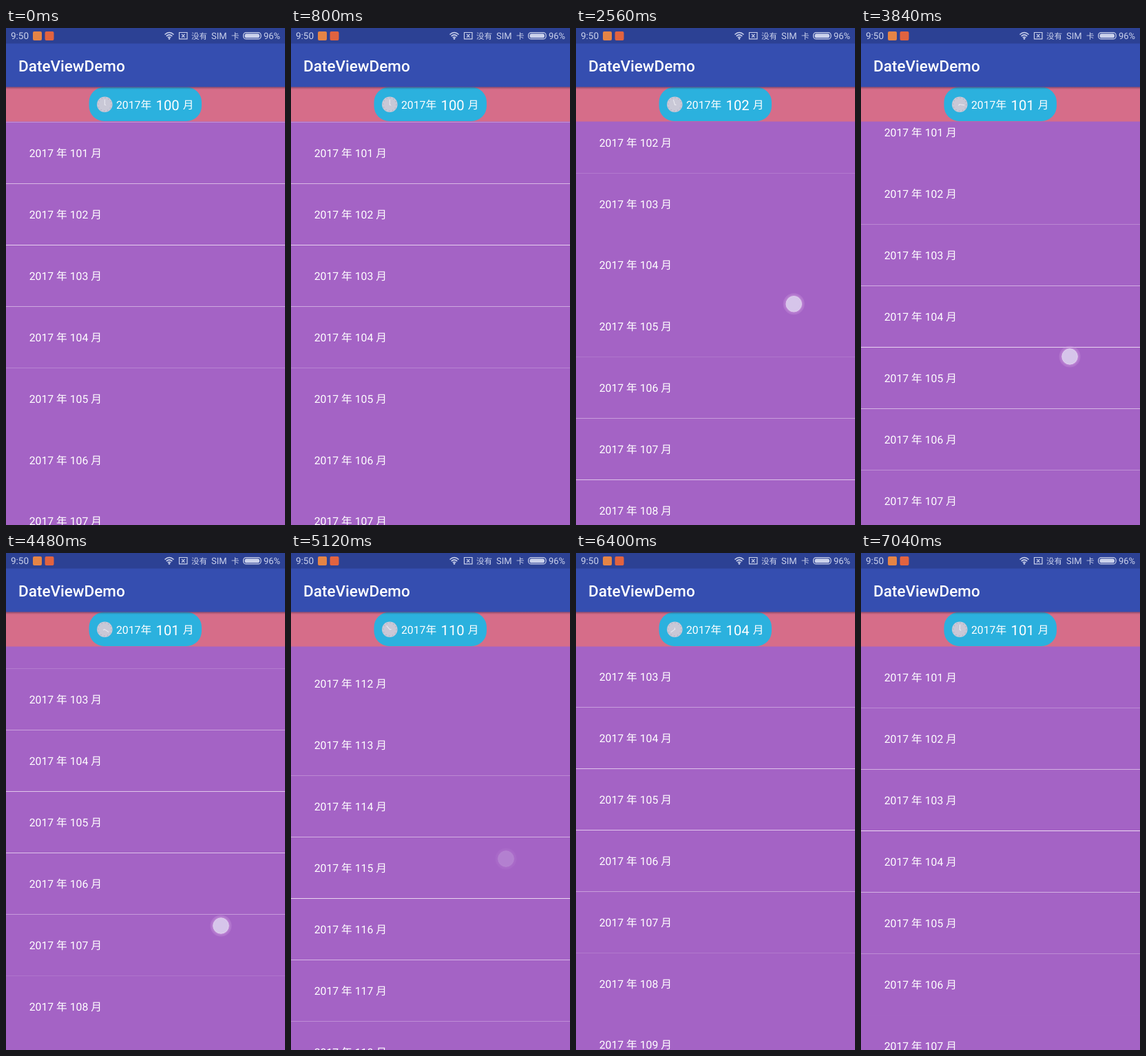
Animation, 405 px wide and 720 px high, one loop 7.2 s. Source, as an HTML page:

```html
<!DOCTYPE html>
<html lang="zh-CN">
<head>
<meta charset="utf-8">
<title>DateViewDemo</title>
<style>
  html, body { margin: 0; width: 100%; height: 100%; overflow: hidden; background: #a463c5; }
  svg { display: block; width: 405px; height: 720px; }
  text {
    font: 15.75px Roboto, "Noto Sans CJK SC", "Noto Sans CJK", sans-serif;
    fill: #fff; white-space: pre; text-rendering: geometricPrecision;
  }
  .status text { font-size: 13px; fill: #cbd2ec; }
  .status .cjk { font-size: 11.6px; }
  .status .line { fill: none; stroke: #cbd2ec; stroke-width: 1.2; }
</style>
</head>
<body>
<svg viewBox="0 0 405 720">
  <defs>
    <linearGradient id="shade" x2="0" y2="1">
      <stop stop-color="#402040" stop-opacity=".5"/>
      <stop offset="1" stop-color="#402040" stop-opacity="0"/>
    </linearGradient>
    <clipPath id="view"><rect y="135" width="405" height="585"/></clipPath>
  </defs>

  <rect width="405" height="720" fill="#a463c5"/>
  <g id="list" clip-path="url(#view)"></g>
  <circle id="glow" cx="202.5" r="1706" fill="#354eb0"/>

  <rect y="85" width="405" height="50.5" fill="#d66d89"/>
  <rect x="120.5" y="85.5" width="163.5" height="49.5" rx="22" fill="#2bb1de"/>
  <rect y="85" width="405" height="4" fill="url(#shade)"/>
  <g transform="translate(143.3 110.7)">
    <circle r="11.3" fill="#c9c8d6"/>
    <circle r="9.6" fill="none" stroke="#aaa7bc" stroke-width="1.5" stroke-dasharray="1 4.027"/>
    <path id="hand" d="M0 1V-7M0 0L2 1.5" fill="none" stroke="#ececf3" stroke-width="1"/>
  </g>
  <text x="160" y="117">2017年</text>
  <text id="month" x="217.5" y="118.5" style="font-size:20.25px"></text>
  <text x="256.8" y="117">月</text>

  <rect width="405" height="85.4" fill="#354eb0"/>
  <text x="18" y="63" style="font-size:22.5px;font-weight:500">DateViewDemo</text>

  <g class="status">
    <rect width="405" height="22.5" fill="#2c4194"/>
    <text x="7" y="16.3" style="font-size:13.5px">9:50</text>
    <rect x="39" y="5" width="13" height="13" rx="2" fill="#e58445"/>
    <rect x="56.5" y="5" width="13" height="13" rx="2" fill="#e2633f"/>
    <path class="line" style="stroke-width:1.6" d="M230.5 9.5Q237 3.5 243.5 9.5M232.7 11.8Q237 8 241.3 11.8M234.8 14Q237 12 239.2 14"/>
    <circle cx="237" cy="15.5" r="1.3" fill="#cbd2ec"/>
    <path class="line" d="M251.5 6.5H263V15.8H251.5ZM255 9L259.5 13.5M259.5 9L255 13.5"/>
    <text class="cjk" x="269" y="16">没有</text>
    <text x="298" y="16.3">SIM</text>
    <text class="cjk" x="327" y="16">卡</text>
    <rect class="line" x="344.6" y="6.6" width="25.5" height="9.3" rx="4"/>
    <rect x="346.5" y="8.3" width="21.5" height="6" rx="2.6" fill="#cbd2ec"/>
    <text x="374" y="16.3">96%</text>
  </g>

  <g id="touch">
    <circle r="15.5" fill="#d9a8e8" opacity=".25"/>
    <circle r="13.2" fill="#d9b4e8" opacity=".25"/>
    <circle r="11.2" fill="#d6c5ea" stroke="#e2d0f0"/>
  </g>
</svg>
<script>
const LOOP = 7200, STEP = 160, FIRST = 100, LAST = 119;
const TOP = 47.85, ROW = 88.875, END = 1105.1;
const DRAG_MID = 2742, DRAG_SPAN = 3393, FLING_UP = 4400, HIT_END = 5440, FLING_DOWN = 5760;
const $ = id => document.getElementById(id);
const clamp = v => Math.min(1, Math.max(0, v));
const progress = (t, from, to) => clamp((t - from) / (to - from));

// A slow drag up and back, a fling to the end, a fling home.
function scroll(t) {
  if (t < FLING_UP) {
    const u = (t - DRAG_MID) / DRAG_SPAN;
    return Math.abs(u) < .5 ? 107.3 * Math.cos(Math.PI * u) ** 2 : 0;
  }
  if (t < FLING_DOWN) return END * (1 - (1 - progress(t, FLING_UP, HIT_END)) ** 1.779);
  return END * (1 - progress(t, FLING_DOWN, 7169)) ** 3;
}

function drag(t) {
  const age = (t - DRAG_MID) / 1120, s = scroll(t);
  return [287.2 + .29 * s + 7.4 * age, 504.3 - s + 1.4 * age];
}
const swipe = (y0, y1) => (t, u) => [312, y0 + (y1 - y0) * u];

const gestures = [
  { from: 1040, to: 4300, path: drag },
  { from: 4400, to: 4640, path: swipe(610, 400) },
  { from: 4800, to: 5120, path: swipe(620, 443) },
  { from: 5680, to: 6000, path: swipe(340, 560) }
];

function add(tag, attrs) {
  const el = document.createElementNS("http://www.w3.org/2000/svg", tag);
  for (const name in attrs) el.setAttribute(name, attrs[name]);
  return $("list").appendChild(el);
}

const rows = [];
for (let n = FIRST; n <= LAST; n++) {
  const label = add("text", { x: 33.75 });
  label.textContent = `2017 年 ${n} 月`;
  rows.push({ label, line: add("rect", { width: 405, height: 1, fill: "#ecd8f2" }) });
}

function drawTouch(t) {
  const g = gestures.find(g => t >= g.from && t < g.to + 48);
  $("touch").setAttribute("opacity", g ? clamp((g.to + 48 - t) / STEP) : 0);
  if (g) $("touch").setAttribute("transform", `translate(${g.path(t, progress(t, g.from, g.to))})`);
}

function draw(t) {
  const offset = scroll(t);
  rows.forEach(({ label, line }, i) => {
    const y = TOP + ROW * i - offset;
    label.setAttribute("y", y + 50.4);
    // Thin dividers fade as they fall between pixel rows.
    const edge = y + ROW, px = Math.floor(edge);
    line.setAttribute("y", px);
    line.setAttribute("opacity", clamp(1 - Math.abs(edge - px - .5) * 8 / 3));
  });

  // The header follows the list one step late.
  $("month").textContent = FIRST + Math.ceil(scroll(t - STEP) / ROW);
  $("hand").setAttribute("transform", `rotate(${offset * 3.3})`);
  drawTouch(t);

  const glow = t < HIT_END ? 0 : 1 - progress(t, HIT_END, HIT_END + 480);
  $("glow").setAttribute("cy", 2426 - 38 * glow);
  $("glow").setAttribute("opacity", .22 * glow);
}

const start = performance.now();
function tick() {
  const t = (performance.now() - start) % LOOP;
  draw(Math.floor(t / STEP) * STEP);
  requestAnimationFrame(tick);
}
tick();
</script>
</body>
</html>
```
